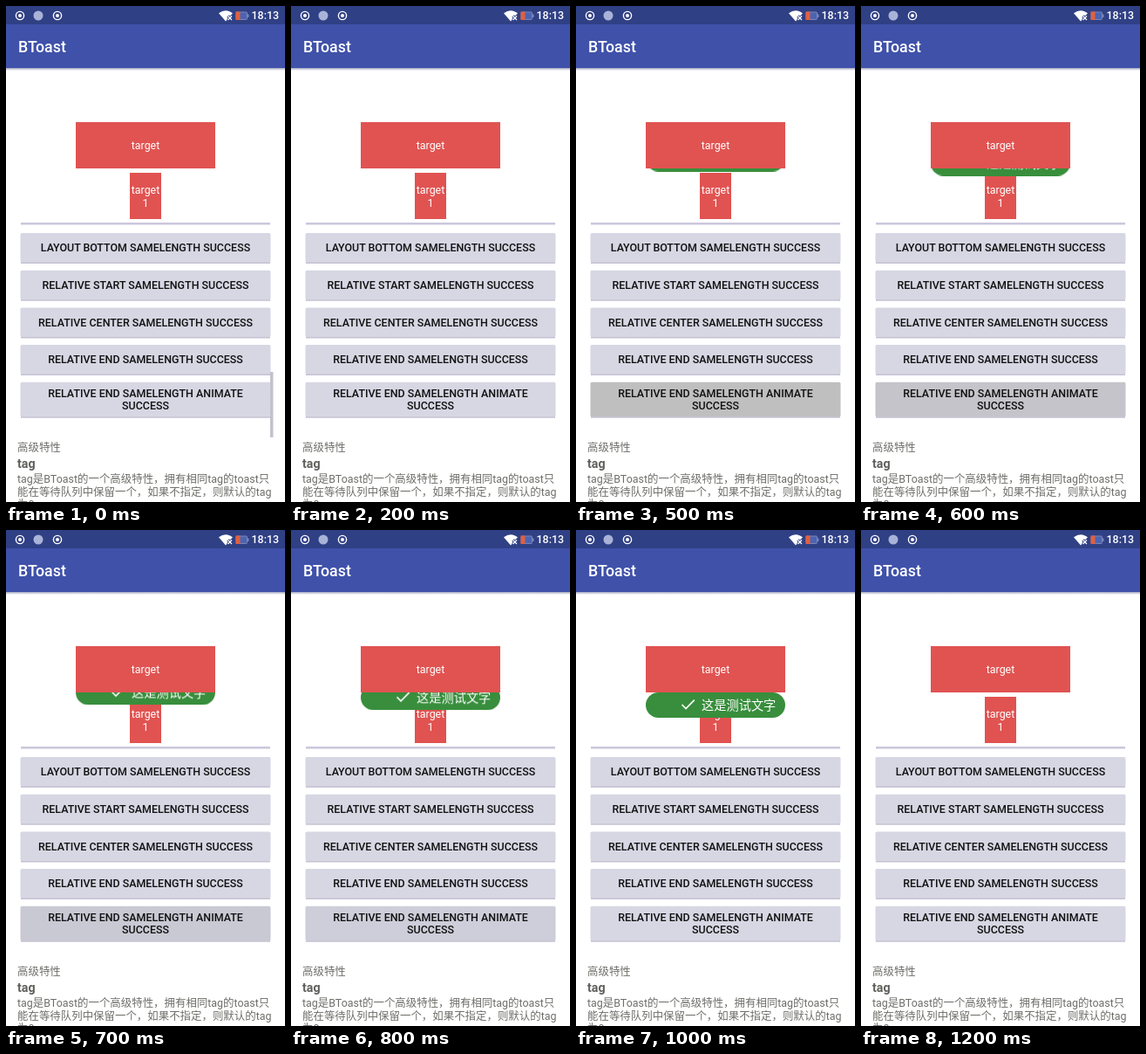
Animation of 320x568 px, one loop 1500 ms. Source, as an HTML page:

```html
<!DOCTYPE html>
<html lang="zh">
<head>
<meta charset="utf-8">
<title>BToast</title>
<style>
  html, body { margin: 0; width: 100%; height: 100%; overflow: hidden; background: #fff; }
  svg { display: block; width: 320px; height: 568px; }
  text { font: 400 12.44px Roboto, "Noto Sans CJK SC", "Noto Sans CJK", sans-serif; }
  .mid { text-anchor: middle; }
  .white { fill: #fff; }
  .title { font-size: 17.78px; font-weight: 500; }
  .clock { font-weight: 500; }
  .target { fill: #e05351; }
  .button rect { fill: #d6d7e3; }
  .button text { font-weight: 500; fill: #111; }
  .body text { fill: #6e6e6a; }
  .body .tag { font-size: 14.22px; font-weight: 700; fill: #5f5f5c; }
  .toast text { font-size: 14.22px; }

  .toast, .scroll, .pressed rect { animation: 1.5s step-end infinite; }
  .toast { animation-name: slide; }
  .scroll { animation-name: fade; }
  .pressed rect { animation-name: press; }

  /* ease-in-out slide, held for 100 ms per step */
  @keyframes slide {
    0% { transform: translateY(-30px); }
    26.66% { transform: translateY(-28.5px); }
    33.33% { transform: translateY(-25.5px); }
    40% { transform: translateY(-20.5px); }
    46.66% { transform: translateY(-14.6px); }
    53.33% { transform: translateY(-8.7px); }
    60% { transform: translateY(-3.8px); }
    66.66% { transform: none; }
    80%, 100% { transform: translateY(-30px); }
  }
  @keyframes fade {
    0% { opacity: 1; }
    6.66% { opacity: .5; }
    13.33%, 100% { opacity: 0; }
  }
  @keyframes press {
    0% { fill: #d6d7e3; }
    20% { fill: #cfcfd8; }
    26.66% { fill: #c4c4c8; }
    33.33% { fill: #bfbfbf; }
    40% { fill: #c4c4ca; }
    46.66% { fill: #c9c9d4; }
    53.33% { fill: #cdced9; }
    60% { fill: #d1d2dd; }
    66.66%, 100% { fill: #d6d7e3; }
  }
</style>
</head>
<body>
<svg viewBox="0 0 320 568">
  <defs>
    <linearGradient id="shade" x2="0" y2="1">
      <stop stop-color="#a3a8c0"/>
      <stop offset="1" stop-color="#fff"/>
    </linearGradient>
    <clipPath id="below"><rect y="186" width="320" height="60"/></clipPath>
    <g id="ring">
      <circle r="4.6" fill="none" stroke="#fff" stroke-width="1.4"/>
      <circle r="2" fill="#fff"/>
    </g>
  </defs>

  <rect width="320" height="568" fill="#fff"/>
  <rect y="71" width="320" height="3" fill="url(#shade)"/>
  <rect y="21" width="320" height="50" fill="#3f51a9"/>
  <rect width="320" height="21" fill="#304085"/>

  <use href="#ring" x="16" y="11"/>
  <circle cx="37" cy="11" r="5.5" fill="#a9b3d8"/>
  <use href="#ring" x="59" y="11"/>
  <path d="M244 8.2Q252 2.4 260 8.2L252 17.4Z" fill="#fff"/>
  <path d="M254.5 11.5l5 5m0-5l-5 5" stroke="#304085" stroke-width="3.5"/>
  <path d="M254.5 11.5l4.5 4.5m0-4.5l-4.5 4.5" stroke="#fff" stroke-width="1.2"/>
  <rect x="264" y="7" width="12.5" height="8.5" rx="1" fill="#4a64b4" stroke="#7d84b4"/>
  <rect x="263.5" y="6.5" width="5" height="9.5" fill="#e0603f"/>
  <rect x="277" y="9.5" width="1.5" height="3.5" fill="#7d84b4"/>
  <text class="white clock" x="281.5" y="15.4">18:13</text>
  <text class="white title" x="14" y="53">BToast</text>

  <rect class="target" x="142" y="191" width="36" height="53"/>
  <text class="white mid" x="160" y="215">target</text>
  <text class="white mid" x="160" y="229.6">1</text>

  <g clip-path="url(#below)">
    <g class="toast">
      <rect x="80" y="186" width="160" height="29" rx="14.5" fill="#388e3c"/>
      <path d="M121.5 200l4.5 4.5 9.8-9.8" fill="none" stroke="#fff" stroke-width="1.7"/>
      <text class="white" x="144" y="206">这是测试文字</text>
    </g>
  </g>

  <rect class="target" x="80" y="133" width="160" height="53"/>
  <text class="white mid" x="160" y="164.4">target</text>

  <rect x="17" y="248" width="286" height="2.5" fill="#cbc6dc"/>
  <g id="buttons"></g>
  <rect class="scroll" x="303" y="419" width="3.5" height="75" fill="#c4c1cc"/>

  <g class="body">
    <text x="13" y="510">高级特性</text>
    <text class="tag" x="13" y="528.5">tag</text>
    <text x="13" y="546.4">tag是BToast的一个高级特性，拥有相同tag的toast只</text>
    <text x="13" y="561">能在等待队列中保留一个，如果不指定，则默认的tag</text>
    <text x="13" y="575.4">为0</text>
  </g>
</svg>
<script>
  const rows = [
    [260, "LAYOUT BOTTOM SAMELENGTH SUCCESS"],
    [302.7, "RELATIVE START SAMELENGTH SUCCESS"],
    [345.4, "RELATIVE CENTER SAMELENGTH SUCCESS"],
    [388, "RELATIVE END SAMELENGTH SUCCESS"],
    [430.7, "RELATIVE END SAMELENGTH ANIMATE", "SUCCESS"]
  ];

  const button = ([y, ...lines]) => {
    const tall = lines.length > 1;
    const height = tall ? 39.5 : 33.5;
    const first = y + (tall ? 16.9 : 21.3);
    const labels = lines.map((line, i) =>
      `<text class="mid" x="160" y="${first + i * 14.6}">${line}</text>`);
    return `<g class="button${tall ? " pressed" : ""}">
      <path d="M17 ${y + height + .5}h286" stroke="#c6c2d2" stroke-width="2"/>
      <rect x="16.5" y="${y}" width="287" height="${height}" rx="1.8"/>
      ${labels.join("")}</g>`;
  };

  document.getElementById("buttons").innerHTML = rows.map(button).join("");
</script>
</body>
</html>
```
